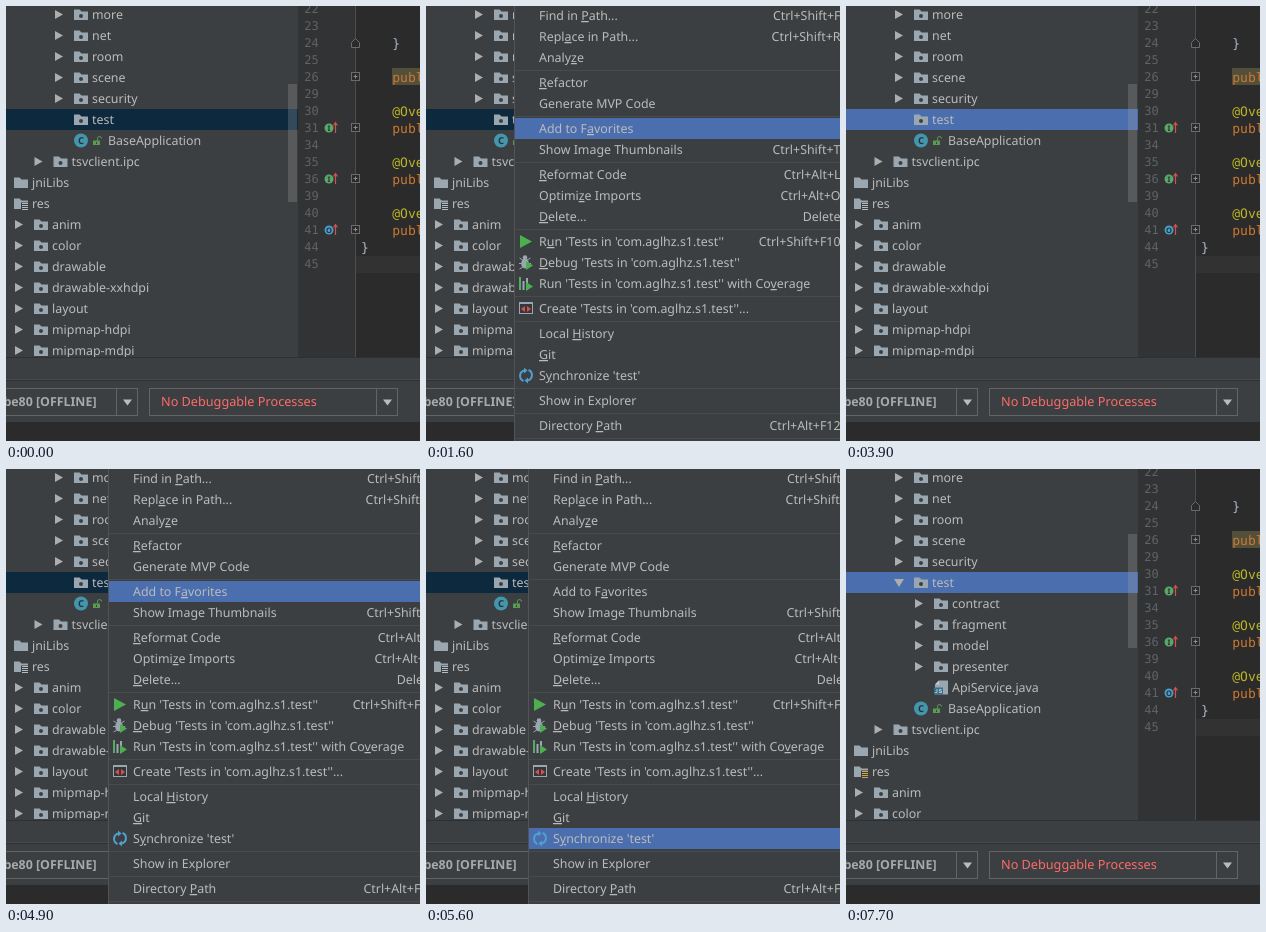
Recreate the animation shown at these times as an HTML page. Size 414 by 435 pixels, loop 8000 ms.

```html
<!DOCTYPE html>
<html lang="en">
<head>
<meta charset="utf-8">
<title>Code generator demo</title>
<style>
  html, body { margin: 0; width: 100%; height: 100%; overflow: hidden; background: #3c3f41; }
  svg { display: block; width: 414px; height: 435px; }
  text { font: 12.4px "Noto Sans", "Open Sans", sans-serif; fill: #bbb; white-space: pre; text-rendering: geometricPrecision; }
  .b { font-weight: 700; }
  .end { text-anchor: end; }
  .mid { text-anchor: middle; }
  .code { font: 13px "DejaVu Sans Mono", monospace; }
  .num { font: 12px "DejaVu Sans Mono", monospace; fill: #606366; }
  .tiny { font: 700 9.5px "Noto Sans", sans-serif; text-anchor: middle; fill: #263238; }
  .mn { text-decoration: underline; }
</style>
</head>
<body>
<svg id="stage" viewBox="0 0 414 435" xmlns="http://www.w3.org/2000/svg"></svg>
<script>
const LOOP = 8000, ROW = 21;
const BG = '#3c3f41', DARK = '#2b2b2b', EDGE = '#646464', ICON = '#9aa7b0', SOFT = '#484b4d';
const BLUE_EDGE = '#437ab3', OK_EDGE = '#43607f';

const rect = (x, y, w, h, fill, more = '') =>
  `<rect x="${x}" y="${y}" width="${w}" height="${h}" fill="${fill}" ${more}/>`;
const path = (d, fill, more = '') => `<path d="${d}" fill="${fill}" ${more}/>`;
const line = (d, color, w = 1) => path(d, 'none', `stroke="${color}" stroke-width="${w}"`);
const text = (x, y, str, more = '') => `<text x="${x}" y="${y}" ${more}>${str}</text>`;
const group = (id, body, more = '') => `<g id="${id}" ${more}>${body}</g>`;
const circle = (x, y, r, fill) => `<circle cx="${x}" cy="${y}" r="${r}" fill="${fill}"/>`;

// Project tree
const closedArrow = (x, y) => path(`M${x} ${y - 4.5}l8 4.5l-8 4.5z`, '#adadad');
const openArrow = (x, y) => path(`M${x - 1} ${y - 3.5}h10l-5 8z`, '#adadad');

function folder(x, y, kind, lines) {
  let s = path(`M${x} ${y - 5}h5.5l2 2h6.5v8.5h-14z`, ICON);
  if (kind === 'pkg' || kind === 'leaf') s += circle(x + 7, y + 1.5, 2, BG);
  if (kind === 'res') {
    s += rect(x + 7, y - 1, 8, 8, BG);
    for (let i = 0; i < 4; i++) s += rect(x + 8, y - 0.5 + i * 2, 6, 1, lines);
  }
  return s;
}

function classIcon(y) {
  return circle(75, y, 7, '#4496ad') + text(75, y + 3.5, 'C', 'class="tiny"') +
    rect(87, y, 7, 4.5, '#5b9a54') + line(`M91.5 ${y}v-2a2 2 0 0 1 4 0`, '#5b9a54') + rect(90, y + 1.5, 1, 2, BG);
}

function fileIcon(x, y) {
  return path(`M${x + 5} ${y - 7}h9v14h-13v-10z`, ICON) +
    path(`M${x + 1} ${y - 3}h4v-4z`, '#c3ccd2') +
    rect(x, y, 9, 7, '#3b6f8c') + line(`M${x + 3} ${y + 1.5}v3.5h-2M${x + 7.5} ${y + 2}h-2v1.5h2v1.5h-2.5`, '#c8d8e0', 0.8);
}

// depth 0..4 sets the indent; each level is about 20px
function treeRow([label, depth, kind = 'pkg'], y, lines) {
  const x = [8, 28, 47.5, 68, 88][depth], base = y + 4.5;
  if (kind === 'class') return classIcon(y) + text(102, base, label);
  if (kind === 'file') return fileIcon(x, y) + text(x + 18, base, label);
  const arrow = depth && kind !== 'leaf' ? closedArrow(x - 19, y) : '';
  return arrow + folder(x, y, kind, lines) + text(x + 18, base, label);
}

const rows = (list, y, lines) => list.map((r, i) => treeRow(r, y + i * ROW, lines)).join('');
const top5 = ['more', 'net', 'room', 'scene', 'security'].map(n => [n, 3]);
const below = [['BaseApplication', 3, 'class'], ['tsvclient.ipc', 2], ['jniLibs', 0, 'plain'], ['res', 0, 'res'],
  ...['anim', 'color', 'drawable', 'drawable-xxhdpi', 'layout', 'mipmap-hdpi', 'mipmap-mdpi'].map(n => [n, 1])];
const made = [...['contract', 'fragment', 'model', 'presenter'].map(n => [n, 4]), ['ApiService.java', 4, 'file']];

const tree = rect(0, 0, 292, 352, BG) + rect(0, 103, 292, ROW, '#0d293e', 'id="sel"') +
  rows([...top5, ['test', 3, 'leaf']], 8.5) +
  group('shut', rows(below, 134.5, '#b4bcc2')) +
  group('open', rows([...made, ...below], 134.5, '#d3a24a')) +
  group('arrowShut', closedArrow(49, 113.5)) + group('arrowOpen', openArrow(49, 113.5)) +
  group('arrowFile', closedArrow(69, 218.5)) +
  rect(282, 78, 9, 118, '#a6a6a6', 'id="thumb" fill-opacity=".25"');

// Editor
const lineNos = [22, 23, 24, 25, 26, 29, 30, 31, 34, 35, 36, 39, 40, 41, 44, 45];
const lineY = n => 3 + lineNos.indexOf(n) * 17;

function mark(n, color, letter) {
  const y = lineY(n);
  return circle(323, y, 4.5, color) + text(323, y + 2.7, letter, 'class="tiny" style="font-size:7.5px"') +
    line(`M329.5 ${y + 5}v-10M327.5 ${y - 2.5}l2 -3l2 3`, '#d8504d', 1.2);
}
function fold(n) {
  const y = lineY(n) - 0.5;
  return rect(345.5, y - 4, 8, 8, DARK, 'stroke="#6b6b6b"') + line(`M347.5 ${y}h4M349.5 ${y - 2}v4`, '#8c8c8c');
}
const code = (n, x, str, color) => text(x, lineY(n) + 4.7, str, `class="code" style="fill:${color}"`);

const editor = rect(292, 0, 58, 352, '#313335') + rect(350, 0, 64, 352, DARK) +
  rect(350, 250, 64, 17, '#323232') + line('M349.5 0V352', '#4b4d4f') +
  lineNos.map(n => text(298.3, lineY(n) + 4.4, n, 'class="num"')).join('') +
  path('M345.5 41.5v-5l4 -4l4 4v5z', DARK, 'stroke="#6b6b6b"') +
  rect(386, 62, 28, 17, '#52503a') +
  code(24, 386.3, '}', '#a9b7c6') + code(44, 355, '}', '#a9b7c6') +
  [26, 31, 36, 41].map(n => fold(n) + code(n, 386.3, 'public', '#cc7832')).join('') +
  [30, 35, 40].map(n => code(n, 386.3, '@Override', '#bbb529')).join('') +
  mark(31, '#59a869', 'I') + mark(36, '#59a869', 'I') + mark(41, '#4a9cc9', 'O');

// Device bar
const combo = (x, w) => rect(x + 0.5, 382.5, w - 1, 27, BG, `stroke="${EDGE}"`) +
  line(`M${x + w - 21.5} 383v27`, EDGE) + path(`M${x + w - 15} 393.5h9l-4.5 6z`, '#bbb');

const bar = rect(0, 351, 414, 65, BG) + rect(0, 351, 414, 1, '#2e3133') + rect(0, 373, 414, 1, SOFT) +
  rect(0, 374, 414, 1, '#2e3133') + rect(0, 416, 414, 19, DARK) +
  combo(-20, 152) + combo(143, 249) +
  text(90.5, 400, 'be80 [OFFLINE]', 'class="b end" style="fill:#a9a9a9"') +
  text(155, 400, 'No Debuggable Processes', 'style="fill:#ff6b68;font-size:12.68px"');

// Context menu; "_" marks the mnemonic and an empty entry is a separator
const tests = `'Tests in 'com.aglhz.s1.test''`;
const items = [
  ['Find in _Path...', 'Ctrl+Shift+F'], ['Repl_ace in Path...', 'Ctrl+Shift+R'], ['Analy_ze'], [],
  ['_Refactor'], ['Generate MVP Code'], [],
  ['Add to F_avorites'], ['Show Image Thumbnails', 'Ctrl+Shift+T'], [],
  ['_Reformat Code', 'Ctrl+Alt+L'], ['Optimi_ze Imports', 'Ctrl+Alt+O'], ['_Delete...', 'Delete'], [],
  [`R_un ${tests}`, 'Ctrl+Shift+F10'], [`_Debug ${tests}`], [`Run ${tests} with Co_verage`], [],
  [`Create ${tests}...`], [], ['Local _History'], ['_Git'], [`S_ynchronize 'test'`], [],
  ['Show in Explorer'], [], ['Directory _Path', 'Ctrl+Alt+F12'], []
];
const itemY = {};
const mnemonic = s => s.replace(/_(.)/, '<tspan class="mn">$1</tspan>');
const play = (x, y) => path(`M${x} ${y}l7 4.5l-7 4.5z`, '#4caf50');

const menuIcons = [
  path('M6 229l12 6.5l-12 6.5z', '#4caf50'),
  // bug
  `<ellipse cx="11" cy="257.5" rx="3.8" ry="5" fill="${ICON}"/>` + circle(11, 251.5, 2.3, ICON) +
    line('M5.5 252l4 2.5M16.5 252l-4 2.5M5 257.5h12M5.5 263l4 -2.5', ICON) + play(12, 255),
  // coverage
  rect(5, 271, 2, 13, '#59a869') + rect(8.5, 275, 2, 9, ICON) + rect(12, 272, 2, 12, ICON) + play(12, 276),
  // configuration window
  rect(5.5, 296.5, 13, 11, '#35383a', `stroke="${ICON}"`) + rect(5, 296, 14, 2, ICON) +
    path('M11 300v6l-4 -3z', '#d8504d') + path('M13 300v6l4 -3z', '#d8504d'),
  // refresh
  line('M9.5 375a5.5 5.5 0 0 1 1 -10.5M14.5 364a5.5 5.5 0 0 1 -1 10.5', '#4f9fd0', 2) +
    path('M10 361.5v6l3.5 -3z', '#4f9fd0') + path('M14 377.5v-6l-3.5 3z', '#4f9fd0')
].join('');

function buildMenu() {
  let y = -1, body = '';
  for (const [label, keys] of items) {
    if (!label) {
      body += rect(1, y + 2, 340, 1, SOFT);
      y += 4;
      continue;
    }
    itemY[label.replace('_', '')] = y;
    body += text(25, y + 15, mnemonic(label));
    if (keys) body += text(326.5, y + 15, keys, 'class="end"');
    y += ROW;
  }
  return rect(0, 0, 345, 435, BG) + rect(0, 0, 1, 435, '#515355') +
    rect(1, 0, 344, ROW, '#4b6eaf', 'id="hot"') + body + menuIcons;
}

// Dialog
const frame = (x, b, r, fill, more) => path(`M${x} -9V${b - r}q0 ${r} ${r} ${r}H430V-9z`, fill, more);
const button = (x, w, fill, edge, id) => rect(x + 0.5, 208.5, w - 1, 25, `url(#${fill})`, `rx="2" stroke="${edge}" id="${id}"`);
const grad = (id, a, b) => `<linearGradient id="${id}" x2="0" y2="1"><stop stop-color="${a}"/><stop offset="1" stop-color="${b}"/></linearGradient>`;

const dialog = frame(21.5, 254.5, 6, '#1d2228') +
  frame(23.5, 252.5, 5, 'url(#shine)', 'stroke="#cdd3d9"') +
  frame(27.5, 247.5, 1, BG, 'stroke="#b4bbc2"') +
  rect(39.5, -5, 363, 203.5, '#45494a', `stroke="${BLUE_EDGE}" id="field"`) +
  group('typed', text(43, 101, '"fragment_layout":"fragment_home",', 'style="font-size:12.1px"') +
    text(274, 101, '"fragment_type":"1" }', 'style="font-size:12.1px"'), 'clip-path="url(#inner)"') +
  rect(46, 88, 1, 17, '#d0d0d0', 'id="caret"') +
  button(261, 61, 'primary', OK_EDGE, 'ok') + text(292, 225.5, 'OK', 'class="b mid"') +
  button(339, 61, 'plain', '#5c6063', 'cancel') + text(370, 225.5, 'Cancel', 'class="mid"');

const defs = `<defs>${grad('primary', '#3a5470', '#24344a')}${grad('pressed', '#24344a', '#2f455e')}${grad('plain', '#555a5c', '#414648')}
  <linearGradient id="shine" gradientUnits="userSpaceOnUse" x1="0" y1="0" x2="0" y2="255">
  <stop stop-color="#f4f6f8"/><stop offset=".17" stop-color="#e4e8ec"/><stop offset=".24" stop-color="#4a525a"/><stop offset="1" stop-color="#2a3037"/></linearGradient>
  <clipPath id="inner"><rect x="46" y="80" width="352" height="30"/></clipPath></defs>`;

const stage = document.getElementById('stage');
stage.innerHTML = defs + tree + editor + bar + group('menu', buildMenu()) + group('dialog', dialog);
const $ = id => document.getElementById(id);
const itemTop = prefix => itemY[Object.keys(itemY).find(k => k.startsWith(prefix))];

// Each step changes only what it names
const start = { focus: false, menu: 0, hot: 'Add', dialog: false, typed: false, caret: 46, pressed: false, arrow: '', file: false };
const sweep = ['Show Image', 'Reformat', 'Delete', 'Debug', 'Create', 'Git', 'Synchronize'];
const steps = [
  [0, start],
  [700, { focus: true }],
  [900, { focus: false, menu: 88 }],
  [1300, { hot: 'Reformat' }],
  [1500, { hot: 'Show Image' }],
  [1600, { hot: 'Add' }],
  [1700, { hot: 'Generate' }],
  [2000, { menu: 0, dialog: true }],
  [2500, { typed: true, caret: 395 }],
  [3000, { caret: 0 }],
  [3400, { pressed: true }],
  [3900, { dialog: false, focus: true }],
  [4900, { focus: false, menu: 102, hot: 'Add' }],
  ...sweep.map((hot, i) => [5000 + i * 100, { hot }]),
  [5900, { menu: 0, focus: true }],
  [6800, { arrow: 'shut' }],
  [7400, { arrow: 'open', file: true }],
  [7700, { file: false }]
];

const show = (id, on) => $(id).setAttribute('visibility', on ? 'visible' : 'hidden');
const set = (id, attrs) => Object.entries(attrs).forEach(([k, v]) => $(id).setAttribute(k, v));

function draw(s) {
  const open = s.arrow === 'open';
  set('sel', { fill: s.focus ? '#4b6eaf' : '#0d293e' });
  show('shut', !open);
  show('open', open);
  show('arrowShut', s.arrow === 'shut');
  show('arrowOpen', open);
  show('arrowFile', s.file);
  set('thumb', open ? { y: 65, height: 114 } : { y: 78, height: 118 });
  $('menu').style.display = s.menu ? '' : 'none';
  set('menu', { transform: `translate(${s.menu})` });
  set('hot', { y: itemTop(s.hot) });
  $('dialog').style.display = s.dialog ? '' : 'none';
  show('typed', s.typed);
  show('caret', s.caret && !s.pressed);
  set('caret', { x: s.caret });
  set('field', { stroke: s.pressed ? EDGE : BLUE_EDGE });
  set('ok', { fill: `url(#${s.pressed ? 'pressed' : 'primary'})`, stroke: s.pressed ? '#6a9ccb' : OK_EDGE });
}

let last = -1;
const t0 = performance.now();
function tick() {
  const t = Math.max(0, performance.now() - t0) % LOOP;
  const past = steps.filter(([at]) => at <= t);
  if (past.length !== last) {
    last = past.length;
    draw(Object.assign({}, ...past.map(p => p[1])));
  }
  requestAnimationFrame(tick);
}
tick();
</script>
</body>
</html>
```
